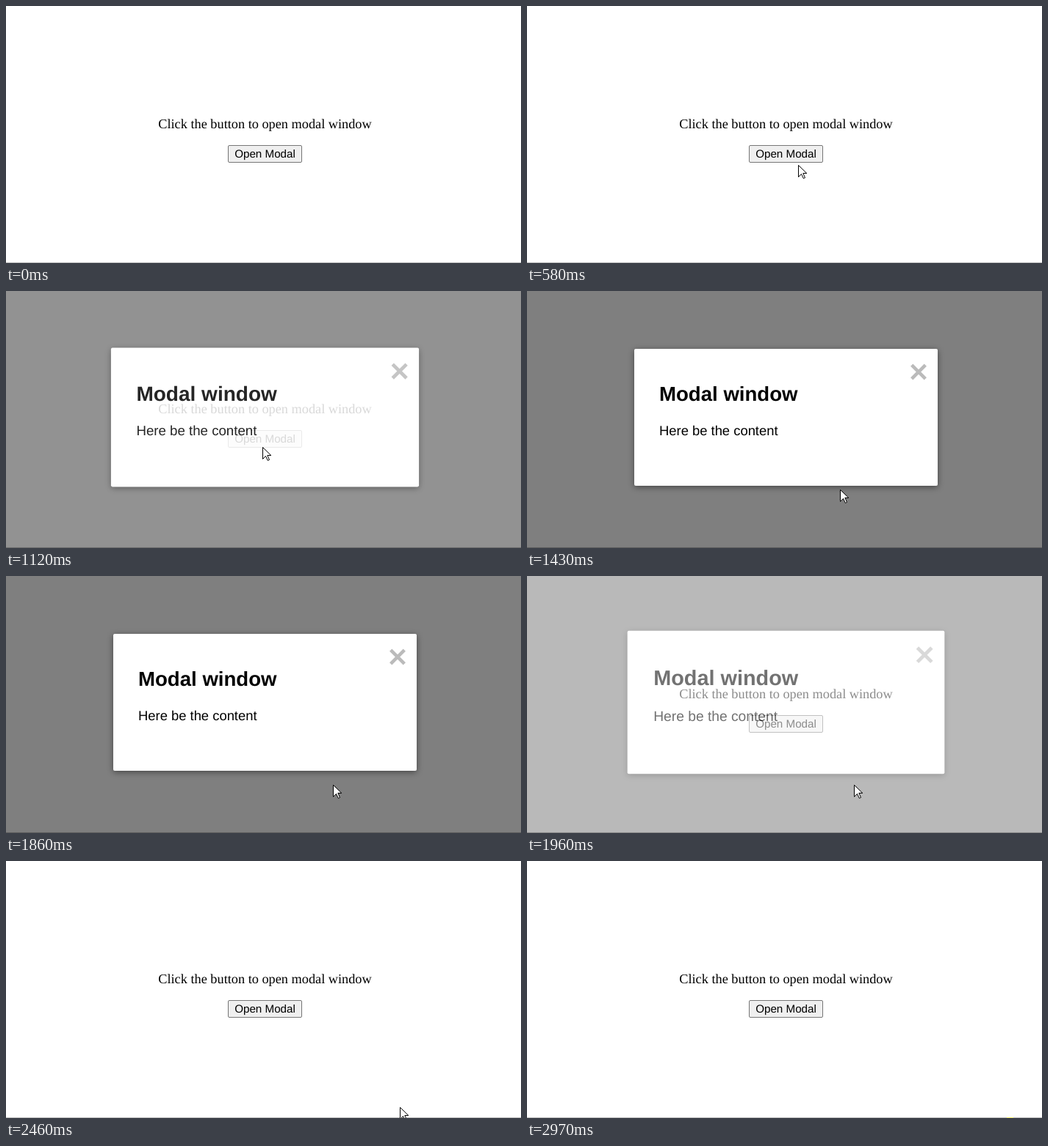
Animation, 701 px wide and 351 px high, one loop 3.07 s. Source, as an HTML page:

```html
<!DOCTYPE html>
<html lang="en">
<head>
<meta charset="utf-8">
<title>Modal window</title>
<style>
  html, body { margin: 0; width: 100%; height: 100%; overflow: hidden; background: #fff; }
  svg { display: block; width: 701px; height: 351px; }
  text { text-rendering: geometricPrecision; }
  .serif { font: 18.3px "Liberation Serif", serif; }
  .sans { font: 18.4px "Liberation Sans", sans-serif; }
  .label { font-size: 15.2px; }
  .title { font-size: 27.6px; font-weight: bold; }
  .button { fill: #efefef; stroke: #767676; }
  .button.hover { fill: #e5e5e5; stroke: #4f4f4f; }
  .panel { filter: drop-shadow(0 2px 4px rgba(0, 0, 0, .45)); }
  #modal { transform-origin: 352.5px 172.5px; }
</style>
</head>
<body>
<svg viewBox="0 0 701 351">
  <text class="serif" x="352.5" y="167" text-anchor="middle">Click the button to open modal window</text>
  <rect id="button" class="button" x="302.5" y="190.5" width="100" height="23" rx="1.5"/>
  <text class="sans label" x="352.5" y="207" text-anchor="middle">Open Modal</text>
  <rect y="350" width="701" height="1" fill="#c0c0c0"/>
  <rect id="glow" x="653" y="350" width="9" height="1" fill="#f2ee6a"/>

  <g id="overlay">
    <rect width="701" height="351" opacity=".5"/>
    <g id="modal">
      <rect class="panel" x="146" y="79" width="413" height="187" rx="2" fill="#fff"/>
      <text class="sans title" x="180" y="150">Modal window</text>
      <text class="sans" x="180" y="197">Here be the content</text>
      <path d="M523.7 101.2l18.6 18.6m0-18.6l-18.6 18.6" stroke="#bbb" stroke-width="4.6"/>
    </g>
  </g>

  <path id="cursor" d="M.5.5v16l4-4 2.8 6 2.2-1-2.7-6h5z" fill="#fff" stroke="#000"/>
</svg>
<script>
const LOOP = 3070, FADE = 300;
const HOVER_AT = 680, OPEN_AT = 955, CLOSE_AT = 1880, CLOSED_AT = 2090, GLOW_AT = 2970;

// Pointer stops: enter, press the button, move below the modal, leave
const STOPS = [
  { t: 120, x: 555, y: 342 },
  { t: 580, x: 369, y: 217 },
  { t: HOVER_AT, x: 349, y: 208 },
  { t: 1040, x: 349, y: 208 },
  { t: 1120, x: 349, y: 213 },
  { t: 1510, x: 445, y: 286 },
  { t: 2210, x: 445, y: 285 },
  { t: 2540, x: 565, y: 352 }
];

const [button, glow, overlay, modal, cursor] =
  ['button', 'glow', 'overlay', 'modal', 'cursor'].map(id => document.getElementById(id));

const progress = (t, from, to) => Math.min(1, Math.max(0, (t - from) / (to - from)));
const mix = (a, b, k) => a + (b - a) * k;
const bezier = (s, a, b) => 3 * a * s * (1 - s) ** 2 + 3 * b * s * s * (1 - s) + s ** 3;
const show = (node, visible) => node.setAttribute('visibility', visible ? 'visible' : 'hidden');

// CSS "ease": cubic-bezier(.25, .1, .25, 1), solved by bisection
function ease(x) {
  let low = 0, high = 1;
  for (let i = 0; i < 24; i++) {
    const mid = (low + high) / 2;
    if (bezier(mid, .25, .25) < x) low = mid; else high = mid;
  }
  return bezier(high, .1, 1);
}

function openness(t) {
  if (t < OPEN_AT || t >= CLOSED_AT) return 0;
  return ease(progress(t, OPEN_AT, OPEN_AT + FADE)) - ease(progress(t, CLOSE_AT, CLOSE_AT + FADE));
}

function drawCursor(t) {
  const next = STOPS.findIndex(stop => stop.t > t);
  show(cursor, next > 0);
  if (next < 1) return;
  const a = STOPS[next - 1], b = STOPS[next];
  const k = progress(t, a.t, b.t);
  const x = Math.round(mix(a.x, b.x, k)), y = Math.round(mix(a.y, b.y, k));
  cursor.setAttribute('transform', `translate(${x} ${y})`);
}

function draw(t) {
  const open = openness(t);
  overlay.style.opacity = open;
  modal.style.transform = `scale(${mix(1.1, 1, open)})`;
  button.classList.toggle('hover', t >= HOVER_AT && t < OPEN_AT);
  show(glow, t >= GLOW_AT);
  drawCursor(t);
}

const start = performance.now();
function tick() {
  draw((performance.now() - start) % LOOP);
  requestAnimationFrame(tick);
}
tick();
</script>
</body>
</html>
```
